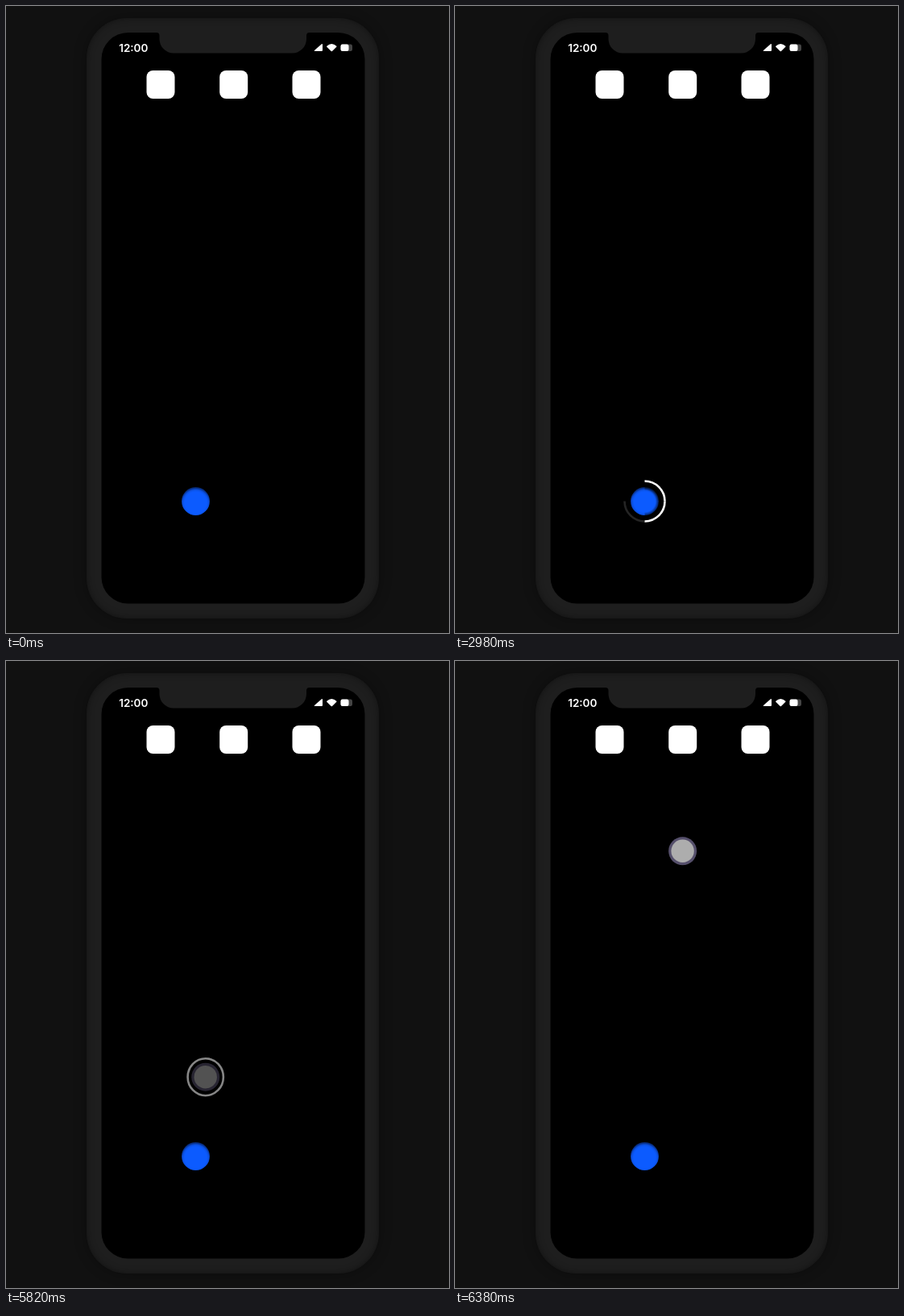
An HTML page for the animation above (8000 ms loop, 550 px wide and 778 px high).

```html
<!DOCTYPE html>
<html lang="en">
<head>
<meta charset="utf-8">
<title>Phone launcher</title>
<style>
  html, body { margin: 0; width: 100%; height: 100%; overflow: hidden; background: #111; }
  .body {
    position: absolute; left: 100px; top: 15px; width: 363px; height: 745px;
    border-radius: 50px; background: #1e1e1e;
    box-shadow: 0 0 16px rgba(0, 0, 0, .32), inset 0 0 10px rgba(0, 0, 0, .42);
  }
  svg { position: absolute; left: 0; top: 0; width: 550px; height: 778px; display: block; }
  text { font: 600 13.5px Inter, sans-serif; fill: #fff; }
</style>
</head>
<body>
<div class="body"></div>
<svg viewBox="0 0 550 778">
  <defs>
    <radialGradient id="blue" gradientUnits="userSpaceOnUse" cx="235.5" cy="616.5" r="19.5">
      <stop offset=".7" stop-color="#0c5bff"/>
      <stop offset=".82" stop-color="#0b52e6"/>
      <stop offset="1" stop-color="#061f58"/>
    </radialGradient>
    <radialGradient id="shade" gradientUnits="userSpaceOnUse" cx="0" cy="0" r="18">
      <stop offset=".74" stop-color="#000" stop-opacity="0"/>
      <stop offset="1" stop-color="#000" stop-opacity=".65"/>
    </radialGradient>
  </defs>

  <rect x="118.5" y="33" width="327" height="708.5" rx="33"/>
  <path fill="#1e1e1e" d="M187 32.5V33Q190.500 33 190.500 37V41A17.500 17.500 0 0 0 208 58.500H355.500A17.500 17.500 0 0 0 373 41V37Q373 33 376.500 33V32.500Z"/>

  <text x="140.200" y="57.300">12:00</text>
  <g fill="#fff">
    <path d="M391.800 47.200Q393 46.600 393 48V55Q393 56 392 56H383.600Q382 56 383 54.900Z"/>
    <path d="M398.300 49.700Q404.300 44.300 410.300 49.700Q410.800 50.200 410.300 50.700L405 56Q404.300 56.600 403.600 56L398.300 50.700Q397.800 50.200 398.300 49.700Z"/>
    <rect x="415.500" y="47.500" width="14.500" height="8.500" rx="2.200" fill="#444"/>
    <rect x="415.500" y="47.500" width="10" height="8.500" rx="2.200"/>
    <rect x="174.500" y="80" width="35" height="35" rx="8"/>
    <rect x="265.200" y="80" width="35" height="35" rx="8"/>
    <rect x="355.500" y="80" width="35" height="35" rx="8"/>
  </g>

  <circle cx="235.500" cy="614.500" r="17.500" fill="url(#blue)"/>
  <g id="quarters" transform="translate(235.5 614.5)"></g>
  <ellipse id="ring" fill="none" stroke="#fff" stroke-width="2.600"/>
  <g id="ball">
    <circle r="17.500" fill="#554f6b"/>
    <circle r="14.200" fill="#adadad"/>
  </g>
</svg>
<script>
  const LOOP = 8000;
  const HOME = { x: 235.5, y: 614.5 }, GOAL = { x: 282.6, y: 235.8 };
  const LAUNCH = 118, LAND = 135;
  const FADES = [[8, 12], [32, 7], [60, 7], [89, 7]]; // first tick, length

  const $ = id => document.getElementById(id);
  const clamp = v => Math.max(0, Math.min(1, v));
  const mix = (a, b, p) => a + (b - a) * p;
  const set = (el, attrs) => {
    for (const k in attrs) el.setAttribute(k, attrs[k]);
  };

  const quarters = FADES.map((_, i) => {
    const g = document.createElementNS("http://www.w3.org/2000/svg", "g");
    set(g, { transform: `rotate(${i * 90})` });
    g.innerHTML = `<path d="M0 0V-18A18 18 0 0 1 18 0Z" fill="url(#shade)"/>
      <path d="M0 -25A25 25 0 0 1 25 0" fill="none" stroke="#fff" stroke-width="2.600"/>`;
    return $("quarters").appendChild(g);
  });

  // Ticks come in threes, lasting 100, 20 and 20 ms.
  function tick(t) {
    const q = Math.floor((t - 80) / 140), r = t - 80 - q * 140;
    return 3 * q + (r < 100 ? 0 : r < 120 ? 1 : 2);
  }

  // Cubic Bezier easing with control points (.353, 0) and (.45, 1).
  function ease(u) {
    let lo = 0, hi = 1;
    for (let i = 0; i < 24; i++) {
      const s = (lo + hi) / 2, v = 1 - s;
      const x = 3 * v * v * s * .353 + 3 * v * s * s * .45 + s * s * s;
      if (x < u) lo = s; else hi = s;
    }
    return lo * lo * (3 - 2 * lo);
  }

  function draw(t) {
    const n = tick(t), flying = n > LAUNCH;
    quarters.forEach((g, i) => {
      const [start, length] = FADES[i];
      set(g, { opacity: flying ? 0 : clamp((n - start) / length) });
    });

    const p = ease(clamp((n - LAUNCH) / (LAND - LAUNCH)));
    const fade = clamp((n - LAUNCH) / 10.5);
    const x = mix(HOME.x, GOAL.x, p), y = mix(HOME.y, GOAL.y, p);
    set($("ring"), {
      cx: x, cy: y, rx: mix(25, 14, p), ry: mix(25, 17.3, p),
      opacity: flying ? 1 - fade : 0
    });
    set($("ball"), { transform: `translate(${x} ${y})`, opacity: fade });
  }

  const begin = performance.now();
  function loop() {
    draw((performance.now() - begin) % LOOP);
    requestAnimationFrame(loop);
  }
  draw(0);
  requestAnimationFrame(loop);
</script>
</body>
</html>
```
